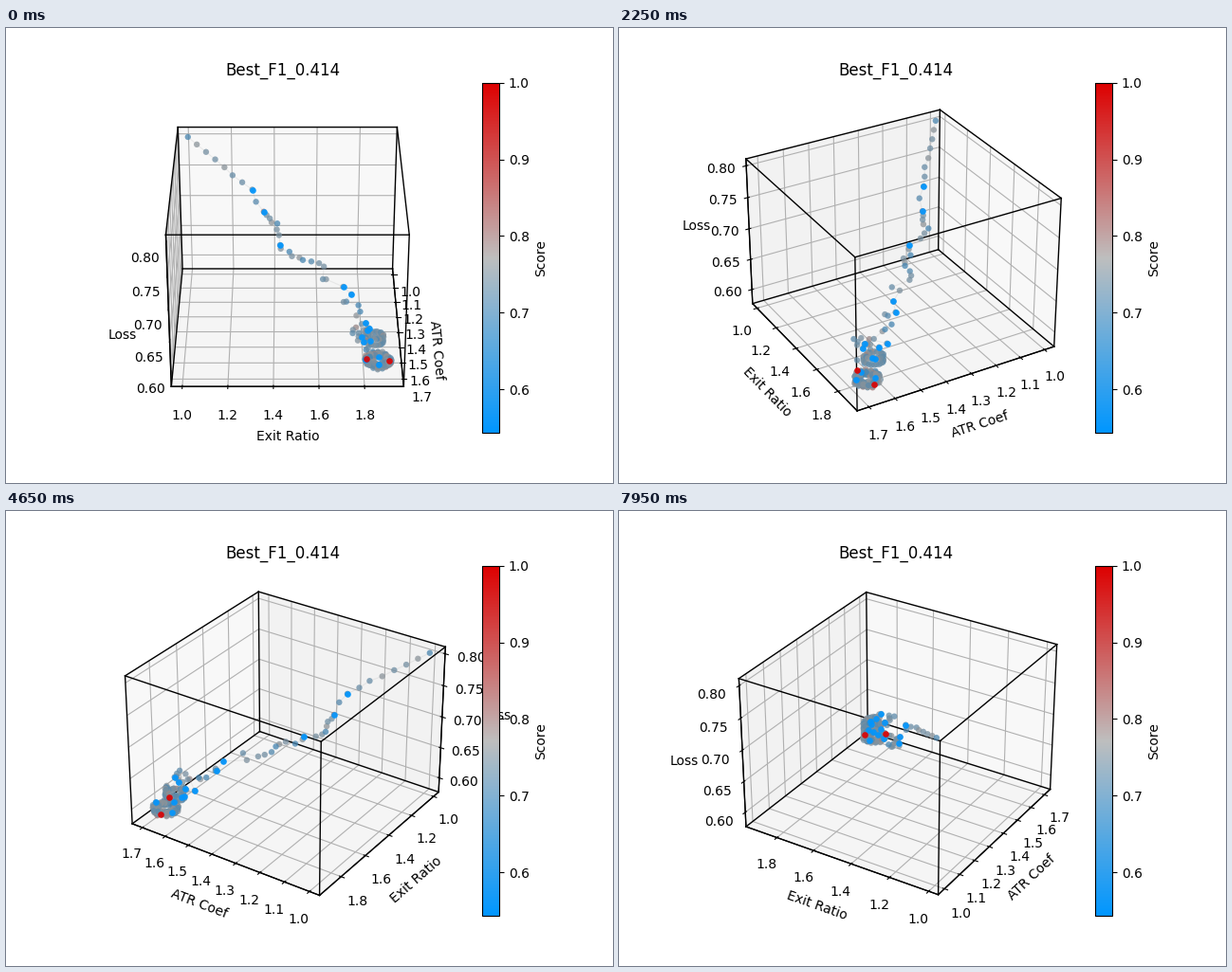
Recreate the animation shown at these times as a matplotlib script. Size 640 by 480 pixels, loop 8 s.

```python
from itertools import combinations, product

import matplotlib.pyplot as plt
import numpy as np
from matplotlib.animation import FuncAnimation
from matplotlib.cm import ScalarMappable
from matplotlib.colors import LinearSegmentedColormap, Normalize

STEP_DEG = 4        # camera turn per step
TICKS_PER_STEP = 3  # 50 ms ticks, so one step every 150 ms
X_LIM, Y_LIM, Z_LIM = (0.96, 1.745), (0.952, 1.972), (0.5763, 0.8107)

rng = np.random.default_rng(4)
cmap = LinearSegmentedColormap.from_list("score", ["#0096ff", "#bebebe", "#dd0000"])
norm = Normalize(0.5432, 1.0)


def search_path(count=40):
    """Descent through a few key points, wandering more towards the end."""
    keys = [0, 7, 9, 13, 17, 24, 28, 33, 39]
    atr = [1.00, 1.19, 1.22, 1.22, 1.30, 1.41, 1.52, 1.56, 1.64]
    exit_ratio = [1.00, 1.30, 1.35, 1.41, 1.44, 1.60, 1.73, 1.77, 1.79]
    loss = [.803, .758, .730, .710, .690, .681, .663, .643, .618]
    step = np.arange(count)
    spine = np.column_stack([np.interp(step, keys, v)
                             for v in (atr, exit_ratio, loss)])
    wander = rng.normal(0, (0.032, 0.026, 0.003), spine.shape)
    return spine + wander * (step[:, None] / count) ** 1.2


def swirl(center, radii, z_range, count, turns, spread):
    """Elliptic orbit that sinks from one loss level to another."""
    angle = np.linspace(0, 2 * np.pi * turns, count)
    size = rng.uniform(1 - spread, 1, count)
    return np.column_stack([
        center[0] + radii[0] * size * np.cos(angle),
        center[1] + radii[1] * size * np.sin(angle),
        np.linspace(*z_range, count),
    ])


path = search_path()
loose = rng.uniform((1.59, 1.74, .608), (1.68, 1.83, .642), (16, 3))
upper = swirl((1.628, 1.845), (0.036, 0.042), (.630, .616), 40, 1.6, 0.12)
lower = swirl((1.660, 1.863), (0.047, 0.060), (.600, .593), 150, 9.3, 0.45)
trail = np.vstack([path, loose, upper, lower])
best = np.vstack([path[[7, 9, 16, 27, 28, 36, 39]], loose[::5], lower[::60]])
reds = np.array([(1.674, 1.808, .603), (1.655, 1.912, .595)])

# Trail markers are the score colour toned down with gray.
scores = rng.normal(0.70, 0.06, len(trail)).clip(0.58, 0.90)
trail_colors = cmap(norm(scores))
trail_colors[:, :3] = 0.5 * trail_colors[:, :3] + 0.5 * 0.43

fig = plt.figure(figsize=(6.4, 4.8), dpi=100)
ax = fig.add_axes([0.125, 0.11, 0.662, 0.77], projection="3d",
                  computed_zorder=False)
ax.set_title("Best_F1_0.414")
ax.set_xlabel("ATR Coef")
ax.set_ylabel("Exit Ratio")
ax.set_zlabel("Loss")

ax.plot(*trail.T, color="gray", lw=0.8, alpha=0.12, zorder=2)
ax.scatter(*trail.T, c=trail_colors, s=21, alpha=0.75, linewidths=0, zorder=3)
for points, level in ((best, 0.0), (reds, 1.0)):
    ax.scatter(*points.T, color=cmap(level), s=23, linewidths=0, alpha=0.9,
               depthshade=False, zorder=4)

# Black outline along all twelve edges of the box
for a, b in combinations(product(X_LIM, Y_LIM, Z_LIM), 2):
    if sum(p != q for p, q in zip(a, b)) == 1:
        ax.plot(*zip(a, b), color="black", lw=1, zorder=2)
ax.set(xlim=X_LIM, ylim=Y_LIM, zlim=Z_LIM)

cax = fig.add_axes([0.78375, 0.11, 0.028875, 0.77])
fig.colorbar(ScalarMappable(norm, cmap), cax=cax, label="Score")


def update(tick):
    # The tiny offset keeps the back walls definite at right angles.
    ax.view_init(elev=30, azim=STEP_DEG * (tick // TICKS_PER_STEP) + 0.001)
    return []


anim = FuncAnimation(fig, update, frames=160, interval=50, repeat=True,
                     repeat_delay=0, blit=False)
plt.show()
```
